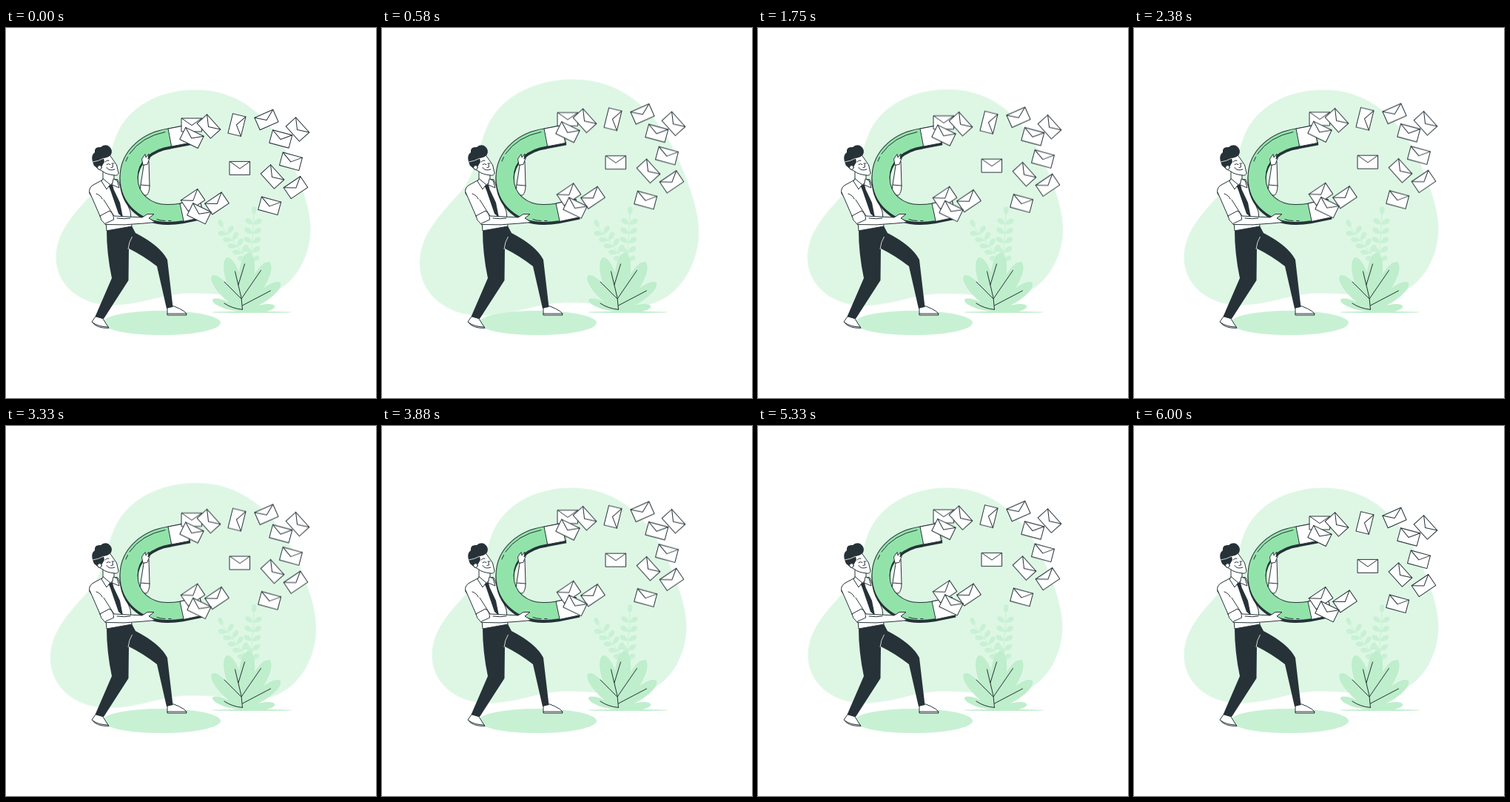
Write an HTML page that moves like this. It is 500 by 500 pixels and loops after 6.04 s.

```html
<!DOCTYPE html>
<html lang="en">
<head>
<meta charset="utf-8">
<title>Mail magnet</title>
<style>
  html, body { margin: 0; width: 100%; height: 100%; overflow: hidden; background: #fff; }
  svg { display: block; width: 100vw; height: 100vh; }
  .line, .paper { stroke: #263238; stroke-linecap: round; stroke-linejoin: round; }
  .line { fill: none; }
  .paper { fill: #fff; }
  .dark { fill: #263238; }
  .pale { fill: #c8f1d4; }
  .bush { fill: #beeecb; }
  .shine { fill: none; stroke: #fff; stroke-width: .8; }
  .bar { fill: none; stroke: #263238; stroke-width: 25; }
  .bar.green { stroke: #92e3a9; stroke-width: 23; }

  #blob { fill: #def7e5; transform-origin: 239.5px 229px; animation: beat 6.04s linear infinite; }
  #mail { animation: float 6.04s linear infinite; }

  /* two beats in the first 3.6 s, then rest */
  @keyframes beat {
    0%, 29.801%, 39.735%, 59.603%, 100% { transform: scale(1); }
    9.934%, 49.669% { transform: scale(1.1); }
  }
  /* four bobs of 1.5 s and a 40 ms rest */
  @keyframes float {
    0%, 24.834%, 49.669%, 74.503%, 99.338%, 100% { transform: translateY(0); }
    12.417%, 37.252%, 62.086%, 86.921% { transform: translateY(-10px); }
  }
</style>
</head>
<body>
<svg viewBox="0 0 500 500">
  <defs>
    <g id="letter">
      <rect class="paper" x="-13.6" y="-9" width="27.2" height="18"/>
      <path class="line" d="M-13.6 -9L0 .6L13.6 -9"/>
    </g>
    <path id="horseshoe" d="M247 143L221 148C192 152 166 172 166 202C166 232 190 251 219 250.600Q228 250.600 237 249L265 243.300"/>
  </defs>

  <path id="blob" d="M256 83.500C205 83.500 165 108 150 143C138 171 138 199 118 222C99 244 67.500 272 67.500 310C67.500 347 100 374.500 143 374.500C185 374.500 210 358.500 250 358.500C290 358.500 315 364 345 362C388 355 411.500 310 411.500 272C411.500 248 403 224 395 203C368 128 322 83.500 256 83.500Z"/>

  <g id="sprigs" class="pale"></g>
  <ellipse class="pale" cx="210" cy="398.500" rx="80" ry="16.500"/>
  <ellipse class="bush" cx="332" cy="384" rx="54" ry="1"/>
  <g id="bush" class="bush"></g>
  <path class="line" d="M319.500 380.500L318 364.500L309.500 329M295 343L318 366L344.500 327.500M314 347L322.500 319M319.500 375L357.500 355M319.500 380.500Q305 379 295 372"/>

  <!-- far arm -->
  <path class="paper" d="M187 182L193 180L194 213Q194 222 190 226H180L182 212Z"/>
  <path class="line" d="M182 212L194 213"/>

  <!-- shoes and trousers -->
  <path class="paper" d="M121 390L116 397Q122 406 139 405.500L131 393Z"/>
  <path class="paper" d="M218 377V388H244Q245 383 227 376Z"/>
  <path class="line" d="M117 398Q125 404 138 404M218 386H244"/>
  <path class="dark" d="M136 273L170 267.500L175 277Q208 294 218 313L225.500 377L217 379L204 322Q186 308 166 298L165.500 341L132 393L120.500 390L143 338Q136 305 136 273Z"/>
  <path class="shine" d="M170.500 282Q166 289 165 299"/>

  <!-- shirt and tie -->
  <path class="paper" d="M131 205L118 212Q111 216 113 224L134 250L136 274L170 268L168 248L151 205Z"/>
  <path class="paper" d="M131 193V207L140 214L146 207V197Z"/>
  <path class="dark" d="M138 212L144 211.500L145.500 218L154 236L158 256L152 251L141 219Z"/>
  <path class="paper" d="M131 204L129 207L136 218L140.500 212ZM145.500 204L150 206L153 216L143.500 212Z"/>

  <!-- head -->
  <path class="paper" d="M125 181L139 170L149.500 185L152 196Q151 200 147 199Q136 198 131 194L126 191Z"/>
  <path class="dark" d="M126 192L119 186Q113 173 120 168Q119 160 128 161Q132 157 138 159Q145 164 142 171Q139 175 132 176L133 181L129 188Z"/>
  <path class="shine" d="M117 181Q125 180 132 176"/>
  <circle class="paper" cx="126.500" cy="188.500" r="2.800"/>
  <path class="line" d="M134 181Q136 178 139 179M136 184.500Q138.500 182.500 141 184.500M143 183H146M144 184L144.500 188L142 188.500M136 188.500Q139 194 147 191"/>

  <!-- magnet -->
  <use href="#horseshoe" class="bar" y="3"/>
  <use href="#horseshoe" class="bar"/>
  <use href="#horseshoe" class="bar green"/>
  <rect class="paper" width="24.500" height="24.500" transform="translate(219 136) rotate(-11)"/>
  <rect class="paper" width="27.500" height="25" transform="translate(235 237) rotate(-12)"/>
  <path class="line" d="M162 180L164.500 174.500M167 170Q183 147 215 140.500M204 258.500Q209 260.500 215 260.500M219.500 260.500H223"/>

  <!-- hands and near arm -->
  <path class="paper" d="M185 185L183.500 177L188 170.500L189 175L193 170L192 177L194.500 175L191 184Z"/>
  <path class="paper" d="M113 222L127 254L134 265.500Q160 267 186 264L202 262.500L193 257L200 251.500L191 251.500L184 256L146 254L132 232"/>
  <path class="paper" d="M127 254L140 247Q146 252 145.500 259L133.500 264.500Q127.500 260 127 254Z"/>
  <path class="line" d="M122 224Q128 226 130 231M150 257Q160 258.500 168 257"/>

  <g id="mail"></g>
</svg>
<script>
  const ns = "http://www.w3.org/2000/svg";
  const add = (parent, tag, attrs) => {
    const el = document.createElementNS(ns, tag);
    for (const key in attrs) el.setAttribute(key, attrs[key]);
    document.getElementById(parent).append(el);
  };

  // round-tipped leaf growing from (x, y), angle in degrees above the horizon
  const leaf = (parent, x, y, angle, len, w) => add(parent, "path", {
    d: `M0 0C${len * .4} ${w} ${len * .95} ${w} ${len} 0C${len * .95} ${-w} ${len * .4} ${-w} 0 0Z`,
    transform: `translate(${x} ${y}) rotate(${-angle})`
  });

  // fan of seven leaves, longest in the middle
  for (let d = -3; d <= 3; d++)
    leaf("bush", 320, 383, 84 + 22 * d + d ** 3 / 3, 80 - 4 * d * d, 14 - .8 * d * d);

  // straight stem with leaf pairs and one leaf at the top
  const sprig = (x, y, dx, dy, tilt) => {
    add("sprigs", "path", { d: `M${x} ${y}l${dx * 6} ${dy * 6}`, stroke: "#c8f1d4" });
    leaf("sprigs", x, y, tilt, 12, 4.5);
    for (let i = 1; i < 6; i++)
      for (const side of [-1, 1])
        leaf("sprigs", x + dx * i, y + dy * i, tilt + side * 58, 13, 4.5);
  };
  sprig(335, 253, -.8, 12.5, 88);
  sprig(293, 270, 6.5, 8.5, 115);

  // envelopes that share a tilt
  const letters = (angle, ...points) => {
    for (const [x, y] of points) add("mail", "use", {
      href: "#letter", transform: `translate(${x} ${y}) rotate(${angle})`
    });
  };
  letters(0, [251, 131], [316, 189.4]);
  letters(48, [274, 133], [394, 137], [360, 201]);
  letters(26, [251, 148.4]);
  letters(-34, [252.5, 232.7], [285, 237], [391.5, 215.6]);
  letters(26, [261, 250.8]);
  letters(15, [371.3, 150], [385, 180.3], [356.2, 240.3]);
  letters(-24, [352, 124]);
  letters(104, [312, 131]);
</script>
</body>
</html>
```
